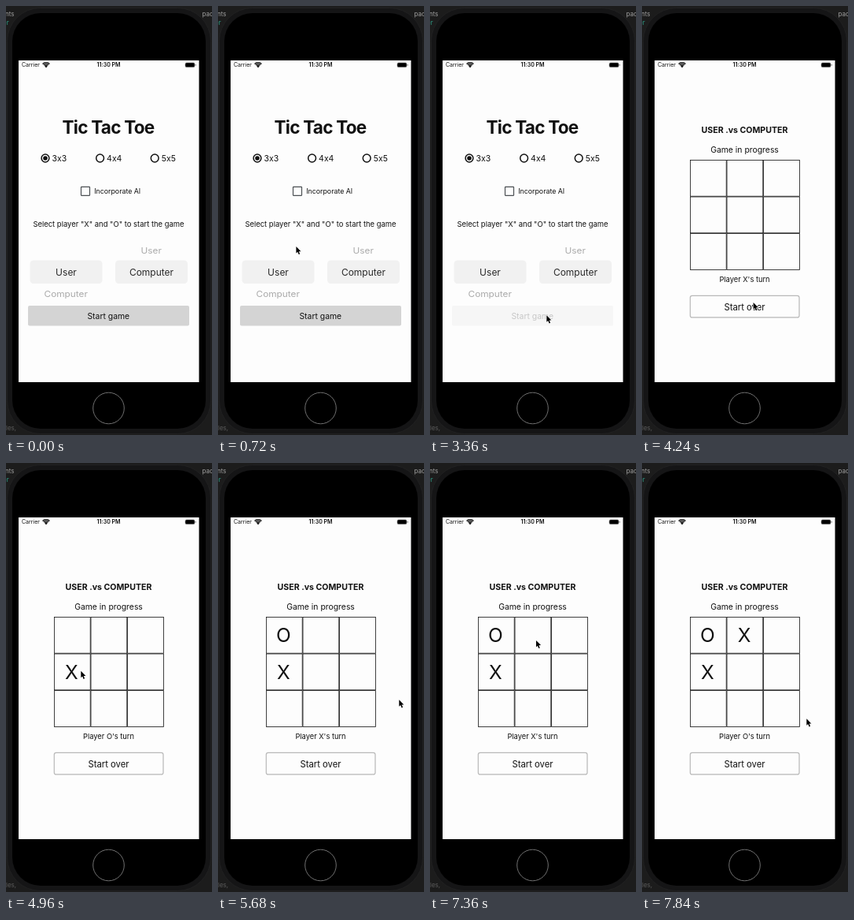
An HTML page with a canvas that plays this animation: 262 px wide and 544 px high, repeating every 8 s.

```html
<!DOCTYPE html>
<html lang="en">
<head>
<meta charset="utf-8">
<title>Tic Tac Toe</title>
<style>
html, body { margin: 0; width: 100%; height: 100%; overflow: hidden; background: #1c1c1c; }
canvas { display: block; width: 262px; height: 544px; }
</style>
</head>
<body>
<canvas id="stage"></canvas>
<script>
const W = 262, H = 544, LOOP = 8000, STEP = 80;
const CENTER = 130.5;
const canvas = document.getElementById('stage');
const dpr = window.devicePixelRatio || 1;
canvas.width = W * dpr;
canvas.height = H * dpr;
const ctx = canvas.getContext('2d');

const GRID = { x: 61, y: 195, cell: 46.6 };

// Each move eases the pointer to (x, y); lift bows the path upwards.
const MOVES = [
  { from: 0, to: 760, x: 100, y: 304 },
  { from: 1120, to: 1680, x: 235, y: 284, lift: 40 },
  { from: 1680, to: 2000, x: 161, y: 368 },
  { from: 2000, to: 2800, x: 148, y: 392 },
  { from: 4080, to: 4800, x: 95, y: 263.5 },
  { from: 5120, to: 5680, x: 230, y: 300 },
  { from: 6000, to: 6880, x: 163, y: 252 },
  { from: 6880, to: 7440, x: 133, y: 223 },
  { from: 7520, to: 7840, x: 209, y: 324 }
];

// Taps on the board: the cell fades while pressed, then shows its mark.
const TURNS = [
  { mark: 'X', col: 0, row: 1, press: 4800, time: 4960 },
  { mark: 'O', col: 0, row: 0, press: 5200, time: 5200 },
  { mark: 'X', col: 1, row: 0, press: 7440, time: 7600 }
];

function pointerAt(t) {
  let x = -12, y = 392;
  for (const m of MOVES) {
    if (t < m.from) break;
    const k = Math.min(1, (t - m.from) / (m.to - m.from));
    const e = k * k * (3 - 2 * k);
    x += (m.x - x) * e;
    y += (m.y - y) * e - (m.lift || 0) * Math.sin(Math.PI * k);
  }
  return [x, y];
}

function text(str, x, y, size, { color = '#111', weight = 400, align = 'center', spacing = 0 } = {}) {
  ctx.font = `${weight} ${size}px Inter, Roboto, sans-serif`;
  ctx.letterSpacing = spacing + 'px';
  ctx.textAlign = align;
  ctx.fillStyle = color;
  ctx.fillText(str, x, y);
}

function box(x, y, w, h, r, fill, stroke, line = 1) {
  ctx.beginPath();
  ctx.roundRect(x, y, w, h, r);
  if (fill) { ctx.fillStyle = fill; ctx.fill(); }
  if (stroke) { ctx.strokeStyle = stroke; ctx.lineWidth = line; ctx.stroke(); }
}

function ring(x, y, r, color, line, a0 = 0, a1 = Math.PI * 2) {
  ctx.beginPath();
  ctx.arc(x, y, r, a0, a1);
  ctx.strokeStyle = color;
  ctx.lineWidth = line;
  ctx.stroke();
}

function dot(x, y, r, color) {
  ctx.beginPath();
  ctx.arc(x, y, r, 0, Math.PI * 2);
  ctx.fillStyle = color;
  ctx.fill();
}

function drawPhone() {
  ctx.fillStyle = '#1c1c1c';
  ctx.fillRect(0, 0, W, H);
  box(1.5, 2.5, 259, 540, 42, '#151516', '#212122');
  box(8, 9, 246, 527, 36, '#000');
  const grey = { color: '#a0a0a0', align: 'left' };
  text('nts', -1, 13, 8, grey);
  text('pac', 249.5, 13, 8, grey);
  text('er', -4, 24, 8, { color: '#2fa08a', align: 'left' });
  text('les,', 0, 538, 8, { color: '#5c5c5c', align: 'left' });
  ring(CENTER, 510, 19.8, '#707070', 1);
  ctx.fillStyle = '#fdfdfd';
  ctx.fillRect(16, 69, 229.5, 408);
}

function drawStatus() {
  text('Carrier', 20, 77.3, 7, { align: 'left' });
  text('11:30 PM', CENTER, 77.3, 7, { weight: 600 });
  for (let i = 1; i <= 3; i++) {
    ring(51, 78, 0.6 + i * 1.9, '#000', 1.3, -Math.PI * 0.75, -Math.PI * 0.25);
  }
  dot(51, 77, 1, '#000');
  box(228, 72, 12, 5.6, 1.7, '#000', '#777', 0.6);
  box(240.8, 73.8, 0.9, 2, 0.4, '#888');
}

function wheelText(str, x, y) {
  ctx.save();
  ctx.translate(x, y);
  ctx.scale(1, 0.88);
  text(str, 0, 4.2, 11.8, { color: '#a9a9a9' });
  ctx.restore();
}

function drawSetup(pressed) {
  text('Tic Tac Toe', 130, 162, 22.6, { weight: 700, spacing: -0.8 });
  for (let i = 0; i < 3; i++) {
    const x = 50 + i * 69.6, n = i + 3;
    ring(x, 193, 4.9, '#111', 1.5);
    if (i === 0) dot(x, 193, 2.8, '#111');
    text(`${n}x${n}`, x + 8.5, 197, 10.5, { align: 'left' });
  }
  box(95.5, 229.3, 11, 11, 0.5, null, '#4c5054', 1.2);
  text('Incorporate AI', 141.7, 238, 8.8);
  text('Select player "X" and "O" to start the game', CENTER, 280, 9.45);

  wheelText('User', 184.7, 310.2);
  wheelText('Computer', 76.2, 365.2);
  ['User', 'Computer'].forEach((name, i) => {
    const x = 30.5 + i * 108.5;
    box(x, 322.5, 92, 29.5, 4.5, '#f1f1f1');
    text(name, x + 46, 341.8, 12, { color: '#2a2a2a' });
  });

  ctx.globalAlpha = pressed ? 0.2 : 1;
  box(28, 380, 205, 25.5, 2, '#d4d4d4');
  text('Start game', 130.3, 397, 10.4);
  ctx.globalAlpha = 1;
}

function drawCell(t, col, row) {
  const { cell } = GRID;
  const x = GRID.x + col * cell, y = GRID.y + row * cell;
  const turn = TURNS.find(m => m.col === col && m.row === row && t >= m.press);
  ctx.globalAlpha = turn && t < turn.time ? 0.25 : 1;
  ctx.strokeStyle = '#111';
  ctx.lineWidth = 0.8;
  ctx.strokeRect(x + 0.4, y + 0.4, cell - 0.8, cell - 0.8);
  if (turn && t >= turn.time) text(turn.mark, x + cell / 2 - 0.9, y + cell / 2 + 8.6, 24.5);
  ctx.globalAlpha = 1;
}

function drawGame(t) {
  const played = TURNS.filter(m => t >= m.time).length;
  text('USER .vs COMPUTER', CENTER, 160.7, 10.6, { weight: 700 });
  text('Game in progress', CENTER, 186, 10.4);
  for (let i = 0; i < 9; i++) drawCell(t, i % 3, Math.floor(i / 3));
  text(`Player ${'XO'[played % 2]}'s turn`, CENTER, 350, 9.3);
  box(61.3, 367.3, 138.7, 27.6, 2.5, '#fdfdfd', '#b8b8b8', 1.2);
  text('Start over', CENTER, 385.6, 11.3);
}

function drawPointer(x, y) {
  const shape = new Path2D('M.3 .3V8.8L2.2 7.1L3.6 10.4L5.1 9.8L3.7 6.6L6.4 6.5Z');
  ctx.save();
  ctx.translate(x, y);
  ctx.lineJoin = 'round';
  ctx.lineWidth = 1.3;
  ctx.strokeStyle = '#fff';
  ctx.stroke(shape);
  ctx.fillStyle = '#000';
  ctx.fill(shape);
  ctx.restore();
}

function render(now) {
  const t = Math.floor((now % LOOP) / STEP) * STEP;
  ctx.setTransform(dpr, 0, 0, dpr, 0, 0);
  drawPhone();
  drawStatus();
  if (t < 3520) drawSetup(t >= 3360);
  else drawGame(t);
  drawPointer(...pointerAt(t));
}

const start = performance.now();
function tick() {
  render(performance.now() - start);
  requestAnimationFrame(tick);
}
tick();
</script>
</body>
</html>
```
